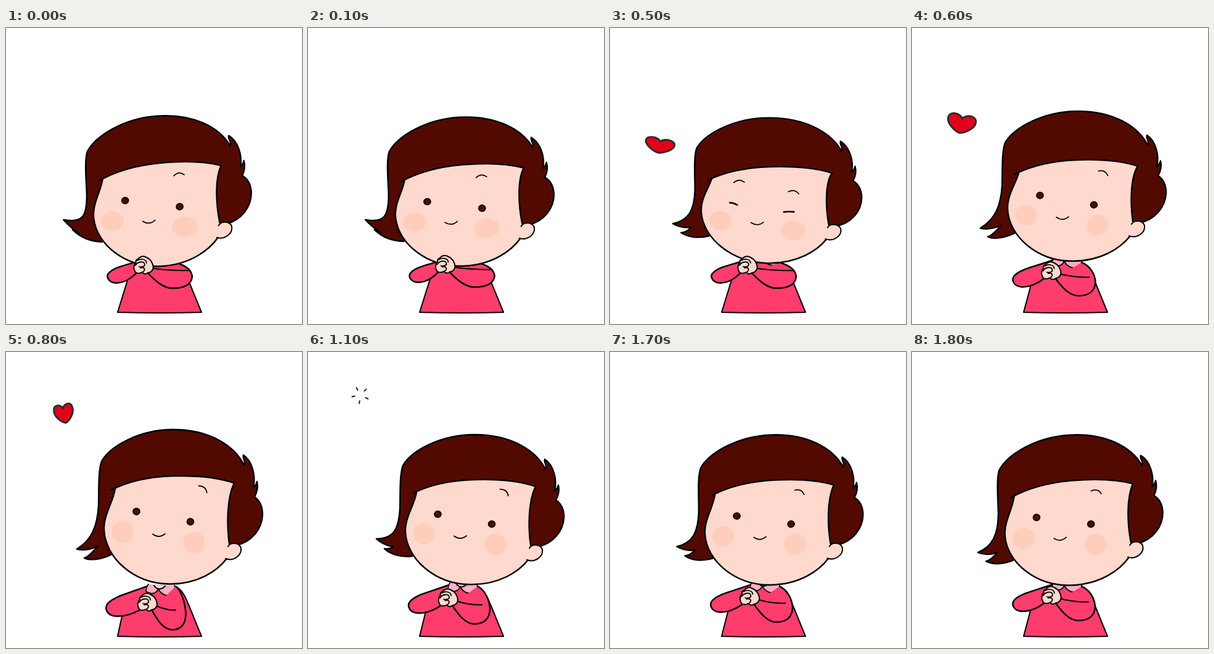
These frames come from a looping animation (480 by 480 pixels, 1.9 s). An HTML page with a canvas:

```html
<!DOCTYPE html>
<html lang="en">
<head>
<meta charset="utf-8">
<title>Girl with a heart</title>
<style>
  html, body { margin: 0; width: 100%; height: 100%; overflow: hidden; background: #fff; }
  canvas { display: block; }
</style>
</head>
<body>
<canvas id="stage" width="480" height="480"></canvas>
<script>
const ctx = document.getElementById('stage').getContext('2d');
const LOOP = 1900, STEP = 100, TAU = 2 * Math.PI;
const HAIR = '#520a00', SKIN = '#ffd9ce', BLUSH = '#ffcdbb', DRESS = '#ff3d6d', COLLAR = '#ffafc6';
const RED = '#e3001b', INK = '#332b2b', LINE = '#000';

// The head is placed by dx, dy and bent by tilt, shear, wide and tall.
// look lowers the face within it, flick drops the hair tips, lift raises the arms.
const rest = { dx: 0, dy: 0, tilt: 0, shear: 0, wide: 0, tall: 0, look: 0, flick: 0, lift: 0, brow: .7, squash: 0 };
const bow = { ...rest, dx: -18, dy: 9, tilt: -.07, shear: .06, look: 4, flick: -12, lift: 14, brow: 0, squash: .8 };
const deepBow = { ...rest, dx: -16, dy: 15, shear: .06, wide: .03, tall: -.06, look: 14, flick: -5, lift: 23, brow: 0, squash: 1 };
const rise = { ...rest, dx: -3, dy: 1, tilt: -.01, look: 7, flick: 19, lift: 5, brow: .5 };
const stretch = { ...rest, dx: 1, dy: -4.5, tall: .03, flick: 19, lift: -7 };
const lean = { ...rest, dx: -9, dy: 1, tilt: -.06, shear: .05, look: 1, flick: 12, lift: 4, brow: .35 };
const timeline = [[0, bow], [400, deepBow], [600, rise], [800, stretch], [1100, rest], [1400, rest], [1800, lean], [LOOP, bow]];

function poseAt(t) {
  const i = timeline.findIndex(([end]) => t < end);
  const [start, from] = timeline[i - 1], [end, to] = timeline[i];
  const u = (t - start) / (end - start);
  const ease = to === lean ? u * u : u * u * (3 - 2 * u);
  const pose = {};
  for (const key in rest) pose[key] = from[key] + (to[key] - from[key]) * ease;
  return pose;
}

function paint(d, fill, width = 2.5) {
  const path = new Path2D(d);
  if (fill) {
    ctx.fillStyle = fill;
    ctx.fill(path);
  }
  ctx.strokeStyle = LINE;
  ctx.lineWidth = width;
  ctx.stroke(path);
}

function ellipse(x, y, rx, ry, fill) {
  ctx.beginPath();
  ctx.ellipse(x, y, rx, ry, 0, 0, TAU);
  ctx.fillStyle = fill;
  ctx.fill();
}

function eye(x, y) {
  ellipse(x, y, 6.3, 6, LINE);
  ellipse(x, y, 4.6, 4.3, HAIR);
}

function placed(x, y, angle, drawing) {
  ctx.save();
  ctx.translate(x, y);
  ctx.rotate(angle);
  drawing();
  ctx.restore();
}

function drawBody({ lift }) {
  // Points further along the arms follow the lift more.
  const p = (x, y, sway, rise) => `${x + sway * lift} ${y - rise * lift}`;
  const shoulder = p(228, 378, 0, .3), wrist = p(216, 411, -.3, 1);
  paint(`M${shoulder} L${p(198, 392, .3, 0)} L181 461 Q250 463 317 461 L297 412 C292 400 287 386 275 380 Z`, DRESS, 2);
  placed(0, -.5 * lift, 0, () => {
    paint('M231 373 C226 380 226 386 230 386 C237 390 243 388 247 381 C252 390 261 393 268 391 C275 388 277 382 273 375', COLLAR, 1.7);
    paint('M240 375 C244 382 252 383 258 376', SKIN, 2);
  });
  paint(`M275 380 C${p(287, 386, .4, 0)} ${p(294, 402, .5, .7)} ${p(295, 416, .5, .9)}
    C${p(295, 431, .4, 1.2)} ${p(287, 441, .3, 1.35)} ${p(270, 441, 0, 1.35)}
    C${p(255, 441, 0, 1.35)} ${p(244, 426, -.2, 1.2)} ${p(234, 411, -.3, 1)}`, DRESS);
  paint(`M${shoulder} C${p(208, 385, 0, .3)} ${p(195, 389, 0, .4)} ${p(184, 393, 0, .4)}
    C${p(172, 398, .1, .5)} ${p(162, 404, .1, .5)} ${p(163, 412, .1, .6)}
    C${p(166, 427, .1, .7)} ${p(190, 428, .1, .7)} ${wrist}`, DRESS);
  paint(`M${p(238, 403, -.3, 1)} Q${p(262, 411, .3, 1.2)} ${p(282, 410, 1, 1.2)}`, null, 2);
}

function drawHands({ lift }) {
  placed(-.3 * lift, -lift, 0, () => {
    paint(`M218 389 C221 384 228 383 232 386 C239 389 243 396 243 403 C242 408 238 411 234 411
      C231 414 227 413 225 410 C220 413 214 412 213 408 C210 403 212 397 215 394 C214 391 216 389 218 389 Z`, SKIN, 2);
    paint(`M217 391 C223 387 232 389 232 395 M214 399 C218 392 228 392 229 397
      C230 401 224 402 220 401 M222 403 C229 401 231 406 226 410`, null, 1.8);
  });
}

function drawHead({ look, flick }) {
  const tip = (x, y, sway, drop) => `${x + sway * flick} ${y + drop * flick}`;
  paint(`M372 316 C397 311 414 291 415 268 C415 256 411 246 402 240
    C406 233 408 225 406 216 C405 220 403 223 400 225 C404 208 399 184 384 174 C382 180 389 184 385 190
    C370 160 330 134 270 134 C215 134 168 160 154 184 C148 200 150 235 149 255
    C147 287 ${tip(139, 303, -.1, .3)} ${tip(111, 303, .15, 1)}
    C${tip(118, 309, .2, .8)} ${tip(128, 314, .3, .5)} ${tip(138, 316, .5, .1)}
    C${tip(134, 319, .3, .4)} ${tip(130, 320, .1, .8)} ${tip(124, 319, .1, .9)}
    C${tip(135, 329, 0, .6)} ${tip(152, 333, 0, .3)} 169 331`, HAIR);
  const fringe = (x, y) => `${x} ${y + .85 * look}`;
  paint(`M${fringe(170, 229)} C${fringe(200, 214)} ${fringe(235, 208)} ${fringe(270, 207)}
    C${fringe(305, 206)} ${fringe(342, 209)} ${fringe(369, 218)} C357 243 357 284 361 313
    C365 322 363 331 357 337 C342 356 310 378 262 377 C205 376 160 335 158 292
    C157 268 172 250 ${fringe(176, 227)}`, SKIN);
  paint('M359 318 C363 311 376 311 380 320 C382 332 368 342 355 337', SKIN, 2);
}

function drawFace({ look, squash, brow }, asleep) {
  placed(0, look, 0, () => {
    ellipse(188, 295, 17.5 + squash, 17 - 2 * squash, BLUSH);
    ellipse(304, 312, 17.5 + 3.5 * squash, 17 - squash, BLUSH);
    const arc = () => paint('M-8.5 1.5 Q0 -6 8.5 1', null, 1.7);
    if (asleep) {
      placed(210, 267, 0, () => paint('M-6 -2 Q0 -2 6 2', null, 2.5));
      placed(298, 281, 0, () => paint('M-8 0 Q0 -1 8 0', null, 2.8));
      placed(220, 230, 0, arc);
    } else {
      eye(210.5, 263);
      eye(298, 279);
    }
    placed(247, 300, 0, () => paint('M-10 -1.5 Q0 6 10 -2', null, 1.7));
    placed(300 + 27 * brow, asleep ? 248 : 227, brow, arc);
  });
}

function drawHeart(u) {
  const wave = Math.sin(TAU * u);
  const w = 13 + 11 * (1 - u) + 26 * Math.sin(Math.PI * Math.sqrt(u));
  const h = 14 + 18 * Math.sin(Math.PI * u);
  placed(89 - 4 * u - 9 * wave, 73 + 158 * (1 - u) ** 1.6, .22 * wave, () => {
    ctx.save();
    ctx.scale(w, h);
    ctx.beginPath();
    ctx.moveTo(0, -.3);
    ctx.bezierCurveTo(.12, -.6, .5, -.6, .5, -.2);
    ctx.bezierCurveTo(.5, .1, .2, .45, 0, .5);
    ctx.bezierCurveTo(-.2, .45, -.5, .1, -.5, -.2);
    ctx.bezierCurveTo(-.5, -.6, -.12, -.6, 0, -.3);
    ctx.restore();
    ctx.fillStyle = RED;
    ctx.fill();
    ctx.lineWidth = 3;
    ctx.strokeStyle = INK;
    ctx.stroke();
  });
}

function drawSparks(u) {
  const radius = 11.5 * (1 + 1.9 * (1 - (1 - u) ** 3));
  ctx.lineWidth = 2.2;
  ctx.strokeStyle = INK;
  ctx.beginPath();
  for (let i = 0; i < 5; i++) {
    const angle = .45 + i * TAU / 5;
    for (const r of [.82 * radius, 1.18 * radius]) {
      const x = 85 + r * Math.cos(angle), y = 70 + r * Math.sin(angle);
      if (r < radius) ctx.moveTo(x, y);
      else ctx.lineTo(x, y);
    }
  }
  ctx.stroke();
}

function draw(t) {
  const pose = poseAt(t);
  ctx.clearRect(0, 0, 480, 480);
  ctx.lineCap = ctx.lineJoin = 'round';
  drawBody(pose);

  ctx.save();
  ctx.translate(265 + pose.dx, 255 + pose.dy);
  ctx.transform(1 + pose.wide, pose.tilt, pose.shear, 1 + pose.tall, 0, 0);
  ctx.translate(-265, -255);
  drawHead(pose);
  drawFace(pose, t >= 200 && t <= 500);
  ctx.restore();

  drawHands(pose);
  if (t >= 400 && t <= 1000) drawHeart((t - 400) / 600);
  if (t >= 1100 && t <= 1300) drawSparks((t - 1100) / 200);
}

function tick() {
  const t = performance.now() % LOOP;
  draw(Math.floor(t / STEP) * STEP);
  requestAnimationFrame(tick);
}
tick();
</script>
</body>
</html>
```
